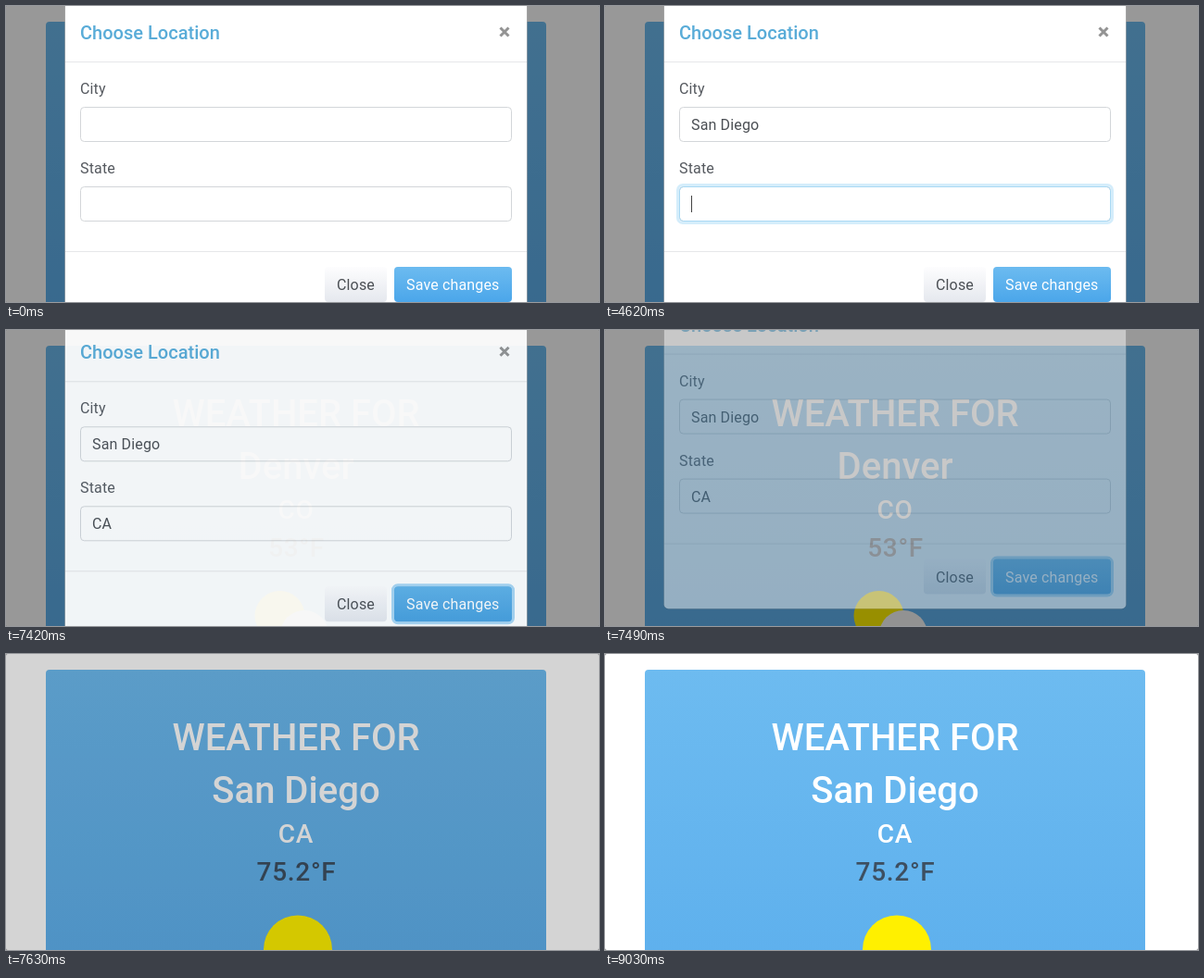
Recreate the animation shown at these times as an HTML page. Size 640 by 320 pixels, loop 9.1 s.

```html
<!DOCTYPE html>
<html lang="en">
<head>
<meta charset="utf-8">
<title>Choose Location</title>
<style>
  html, body { margin: 0; width: 100%; height: 100%; overflow: hidden; background: #777; }
  svg { display: block; font: 16px Roboto, Inter, sans-serif; letter-spacing: .15px; }
  .panel { font-weight: 500; text-anchor: middle; fill: #fff; letter-spacing: 0; }
  .big { font-size: 40px; }
  .mid { font-size: 28px; letter-spacing: .7px; }
  .label { fill: #55595f; }
  .value { fill: #4b4f54; white-space: pre; }
  .glow { fill: none; stroke: #d4edfb; stroke-width: 3; }
  .ring { fill: none; stroke: #a9d9f4; }
</style>
</head>
<body>
<svg width="640" height="320" viewBox="0 0 640 320">
  <defs>
    <linearGradient id="sky" x2="0" y2="1"><stop stop-color="#6dbbf0"/><stop offset="1" stop-color="#5eb0ed"/></linearGradient>
    <linearGradient id="light" x2="0" y2="1"><stop stop-color="#fdfdfe"/><stop offset="1" stop-color="#e5e8ee"/></linearGradient>
    <linearGradient id="blue" x2="0" y2="1"><stop stop-color="#6cbbf0"/><stop offset="1" stop-color="#4ba6ea"/></linearGradient>
    <linearGradient id="hoverBlue" x2="0" y2="1"><stop stop-color="#5fb2e8"/><stop offset="1" stop-color="#469fdf"/></linearGradient>
  </defs>
  <rect width="640" height="320" rx="2" fill="#fff"/>

  <g class="panel">
    <rect x="43" y="17" width="540" height="320" rx="4" fill="url(#sky)"/>
    <text class="big" x="313" y="104">WEATHER FOR</text>
    <text class="big" id="place" x="313" y="161"></text>
    <text class="mid" id="region" x="313" y="204"></text>
    <text class="mid" id="temp" x="313.5" y="245" fill="#3d4f61"></text>
    <circle id="sun" fill="#fff000"/>
    <circle id="cloud" cx="322" cy="329" r="26" fill="#f4f4f4"/>
  </g>

  <rect id="backdrop" width="640" height="320" rx="2"/>

  <g id="modal">
    <rect x="63.5" y="-20" width="499" height="356" rx="5" fill="#fff" stroke="#000" stroke-opacity=".2"/>
    <text x="80" y="36" fill="#59acd8" font-size="20" font-weight="500" letter-spacing="0">Choose Location</text>
    <path d="M533.5 23.5l9 9m0-9l-9 9" stroke="#939393" stroke-width="3"/>
    <path d="M64 60.5h498M64 265.5h498" stroke="#e6e7e9"/>
    <text class="label" x="80" y="95">City</text>
    <text class="label" x="80" y="181">State</text>
    <g id="fields"></g>
    <rect x="344" y="282" width="67" height="38" rx="4" fill="url(#light)"/>
    <text class="value" x="357" y="307">Close</text>
    <rect x="419" y="282" width="127" height="38" rx="4" fill="url(#blue)"/>
    <g id="pressed">
      <rect x="417.5" y="280.5" width="130" height="41" rx="5.5" fill="none" stroke="#a9d7f4" stroke-width="3"/>
      <rect x="419" y="282" width="127" height="38" rx="4" fill="url(#hoverBlue)"/>
    </g>
    <text x="432" y="307" fill="#fff">Save changes</text>
  </g>
</svg>
<script>
const LOOP = 9100, STEP = 70, BLINK = 530;
const SAVE = 7140, HIDE = 7410, UNDIM = 7543, LOADED = 7630;
const $ = id => document.getElementById(id);
const clamp = v => Math.max(0, Math.min(1, v));
const set = (el, attrs) => { for (const k in attrs) el.setAttribute(k, attrs[k]); };

const fields = [
  { y: 109, text: 'San Diego', focus: 1120, blur: 4270,
    keys: [2660, 2800, 2940, 3150, 3290, 3430, 3570, 3850, 3990] },
  { y: 195, text: 'CA', focus: 4270, blur: SAVE, keys: [5390, 6020] }
];

for (const f of fields) {
  const g = document.createElementNS('http://www.w3.org/2000/svg', 'g');
  g.innerHTML = `
    <rect x="80.5" y="${f.y + .5}" width="465" height="37" rx="4" fill="#fff" stroke="#d3d6d9"/>
    <g><rect class="glow" x="78.5" y="${f.y - 1.5}" width="469" height="41" rx="5.5"/>
    <rect class="ring" x="80.5" y="${f.y + .5}" width="465" height="37" rx="4"/></g>
    <text class="value" x="93" y="${f.y + 25}"></text>
    <rect y="${f.y + 10}" width="1" height="18" fill="#444"/>`;
  $('fields').append(g);
  [, f.glow, f.value, f.caret] = g.children;
}

function drawField(f, t) {
  const typed = f.keys.filter(k => k <= t);
  const last = typed.length ? typed[typed.length - 1] : f.focus;
  const active = t >= f.focus && t < f.blur;
  f.value.textContent = f.text.slice(0, typed.length);
  set(f.glow, { opacity: clamp((t - f.focus + STEP) / 150) * (1 - clamp((t - f.blur) / 150)) });
  set(f.caret, {
    x: 93 + Math.round(f.value.getComputedTextLength()),
    opacity: active && Math.floor((t - last) / BLINK) % 2 === 0 ? 1 : 0
  });
}

function draw(t) {
  fields.forEach(f => drawField(f, t));
  set($('pressed'), { opacity: clamp((t - SAVE) / 150) });

  const slide = 1 - (1 - clamp((t - HIDE) / 300)) ** 1.7;
  set($('modal'), {
    opacity: 1 - clamp((t - HIDE) / 150),
    transform: `translate(0 ${-84 * slide})`
  });
  const dim = t < LOADED ? 1 : 1 - clamp((t - UNDIM) / 150);
  set($('backdrop'), { opacity: .404 * dim });

  const loaded = t >= LOADED;
  $('place').textContent = loaded ? 'San Diego' : 'Denver';
  $('region').textContent = loaded ? 'CA' : 'CO';
  $('temp').textContent = loaded ? '75.2°F' : '53°F';
  set($('sun'), loaded ? { cx: 315, cy: 319.5, r: 37 } : { cx: 295.5, cy: 309, r: 27 });
  set($('cloud'), { opacity: loaded ? 0 : 1 });
}

const start = performance.now();
function tick() {
  const t = (performance.now() - start) % LOOP;
  draw(Math.floor(t / STEP) * STEP);
  requestAnimationFrame(tick);
}
tick();
</script>
</body>
</html>
```
